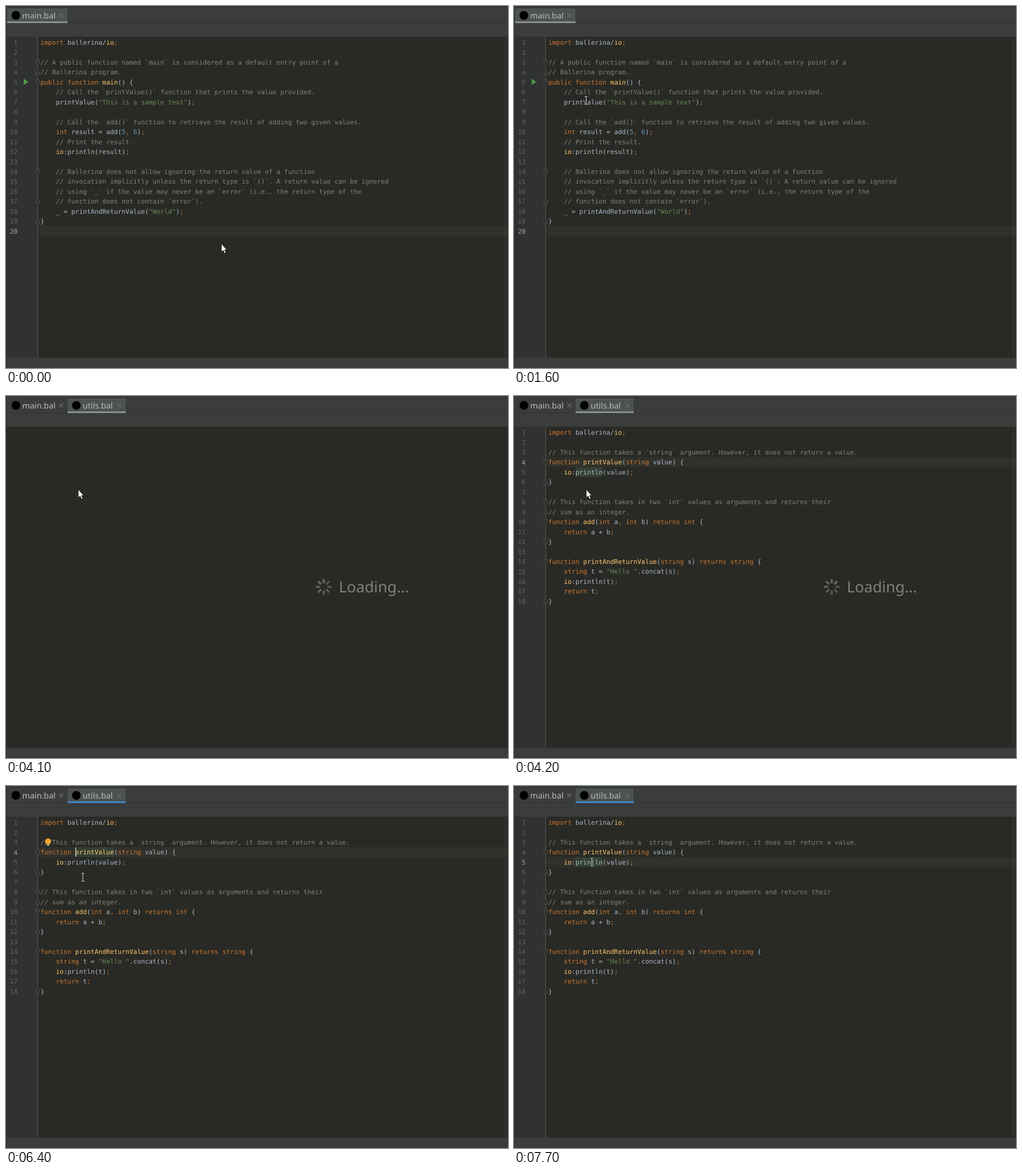
Recreate the animation shown at these times as an HTML page. Size 880 by 636 pixels, loop 8 s.

```html
<!DOCTYPE html>
<html lang="en">
<head>
<meta charset="utf-8">
<title>Go to definition</title>
<style>
html, body { margin: 0; width: 100%; height: 100%; overflow: hidden; background: #292a25; }
svg { display: block; width: 880px; height: 636px; }
text { white-space: pre; text-rendering: geometricPrecision; }
.code { font: 11.27px "DejaVu Sans Mono", monospace; fill: #a9b7c6; }
.num { font: 11.27px "DejaVu Sans Mono", monospace; fill: #606366; text-anchor: end; }
.num.on { fill: #a4a3a3; }
.ui { font: 14.3px "Noto Sans", sans-serif; fill: #bbbbbb; }
.kw { fill: #cc7832; }
.str { fill: #6a8759; }
.int { fill: #6897bb; }
.com { fill: #808080; }
.fn { fill: #ffc66d; }
</style>
</head>
<body>
<svg id="stage" viewBox="0 0 880 636"></svg>
<script>
const NS = 'http://www.w3.org/2000/svg';
const LOOP = 8000, STEP = 100;
const X0 = 60.3, CW = 6.785, TOP = 55.1, LH = 17.45;
const stage = document.getElementById('stage');

const colX = c => X0 + c * CW;
const rowY = n => TOP + (n - 1) * LH;

function add(parent, tag, attrs, text) {
  const el = document.createElementNS(NS, tag);
  for (const k in attrs) el.setAttribute(k, attrs[k]);
  if (text !== undefined) el.textContent = text;
  parent.appendChild(el);
  return el;
}
const group = (parent = stage) => add(parent, 'g', {});
const rect = (p, x, y, width, height, fill) => add(p, 'rect', { x, y, width, height, fill });
const show = (el, on) => el.setAttribute('visibility', on ? 'visible' : 'hidden');

const files = {
  main: {
    lines: `import ballerina/io;

// A public function named \`main\` is considered as a default entry point of a
// Ballerina program.
public function main() {
    // Call the \`printValue()\` function that prints the value provided.
    printValue("This is a sample text");

    // Call the \`add()\` function to retrieve the result of adding two given values.
    int result = add(5, 6);
    // Print the result.
    io:println(result);

    // Ballerina does not allow ignoring the return value of a function
    // invocation implicitly unless the return type is \`()\`. A return value can be ignored
    // using \`_\` if the value may never be an \`error\` (i.e., the return type of the
    // function does not contain \`error\`).
    _ = printAndReturnValue("World");
}
`.split('\n'),
    opens: [3, 5, 14], closes: [4, 17, 19]
  },
  utils: {
    lines: `import ballerina/io;

// This function takes a \`string\` argument. However, it does not return a value.
function printValue(string value) {
    io:println(value);
}

// This function takes in two \`int\` values as arguments and returns their
// sum as an integer.
function add(int a, int b) returns int {
    return a + b;
}

function printAndReturnValue(string s) returns string {
    string t = "Hello ".concat(s);
    io:println(t);
    return t;
}`.split('\n'),
    opens: [4, 8, 10, 14], closes: [6, 9, 12, 18]
  }
};

const TOKEN = /(?<com>\/\/.*)|(?<str>"[^"]*")|(?<fn>(?<=function )\w+|\bio\b)|(?<kw>\b(?:import|public|function|int|string|returns?)\b|[;,])|(?<int>\b\d+\b)|(?<plain>\w+|[^\s\w;,"])/g;

function drawLine(parent, line, n) {
  const el = add(parent, 'text', { class: 'code', y: rowY(n) + 12.9 });
  for (const m of line.matchAll(TOKEN)) {
    const kind = Object.keys(m.groups).find(k => m.groups[k] !== undefined);
    add(el, 'tspan', { x: colX(m.index), class: kind }, m[0]);
  }
}

function drawFold(parent, n, dir) {
  const y = rowY(n) + 8.9;
  add(parent, 'path', {
    d: 'M-3.2 -3.8h6.4v5l-3.2 2.8l-3.2 -2.8zM-1.7 -0.6h3.4',
    transform: `translate(55.5 ${y}) scale(1 ${dir})`,
    fill: '#292a25', stroke: '#595a57', 'stroke-width': 0.9
  });
}

function drawFile({ lines, opens, closes }) {
  const g = group();
  const nums = lines.map((line, i) => {
    drawLine(g, line, i + 1);
    return add(g, 'text', { class: 'num', x: 20.3, y: rowY(i + 1) + 13.1 }, i + 1);
  });
  opens.forEach(n => drawFold(g, n, 1));
  closes.forEach(n => drawFold(g, n, -1));
  return { g, nums };
}

function drawTab(x, width, label) {
  const g = group();
  const back = rect(g, x, 4, width, 25, '#4d5152');
  rect(g, x + width, 4, 1, 25, '#313434');
  const bar = rect(g, x, 27, width, 3, '#8b8f90');
  add(g, 'circle', { cx: x + 15.3, cy: 16.5, r: 7.7, fill: '#000' });
  add(g, 'text', { class: 'ui', x: x + 26.6, y: 22 }, label);
  add(g, 'path', {
    d: `M${x + width - 14.7} 13.2l7 7m0 -7l-7 7`,
    stroke: '#6f7374', 'stroke-width': 1.1
  });
  return { g, back, bar };
}

// Window
rect(stage, 0, 0, 880, 636, '#292a25');
const frame = group();
rect(frame, 0, 54, 55.5, 564, '#303231');
const caretRow = rect(frame, 56, 0, 824, LH, '#31312b');
rect(frame, 55, 54, 1, 564, '#555754');
rect(frame, 875, 54, 1, 564, '#40413b');
const mark = rect(frame, 0, 0, 1, LH - 0.6, '#344134');
rect(stage, 0, 0, 880, 54, '#3a3d3c');
rect(stage, 0, 2.5, 880, 1, '#2d302f');
rect(stage, 0, 29, 880, 1, '#2d302f');
rect(stage, 0, 618, 880, 18, '#3a3d3c');
rect(stage, 0, 0, 1, 636, '#2b2d2d');
rect(stage, 0, 128, 1, 23, '#1f2d40');

const tabs = { main: drawTab(2, 106, 'main.bal'), utils: drawTab(108, 102, 'utils.bal') };
const pages = { main: drawFile(files.main), utils: drawFile(files.utils) };
add(pages.main.g, 'path', { d: 'M31 127.8L39 133.3L31 138.8z', fill: '#519a45' });

const caret = rect(stage, 0, 0, 1.4, LH - 1, '#c4c4c4');

const bulb = group();
add(bulb, 'circle', { cx: 73.8, cy: 97.3, r: 5.4, fill: '#f0a732' });
rect(bulb, 71.5, 100, 4.6, 2.4, '#f0a732');
rect(bulb, 71.5, 103, 4.6, 2, '#a5a9ab');

const loading = group();
const spokes = Array.from({ length: 8 }, (_, i) => add(loading, 'path', {
  d: 'M0 -6.3V-13.8', stroke: '#808080', 'stroke-width': 3.5,
  transform: `translate(557 335.3) rotate(${i * 45})`
}));
add(loading, 'text', { x: 583.6, y: 345, class: 'com', style: 'font: 26.7px "Noto Sans", sans-serif' }, 'Loading...');

const arrow = add(stage, 'path', {
  d: 'M0 0V14.6L3.2 11.7L5.5 17L8 15.9L5.7 10.8H9.6z',
  fill: '#fff', stroke: '#111', 'stroke-width': 0.9
});
const beam = group();
const beamShape = 'M-2.6 -7H-1Q0 -7 0 -6V6Q0 7 -1 7H-2.6M2.6 -7H1Q0 -7 0 -6M2.6 7H1Q0 7 0 6';
add(beam, 'path', { d: beamShape, fill: 'none', stroke: '#111', 'stroke-width': 2.4 });
add(beam, 'path', { d: beamShape, fill: 'none', stroke: '#fff', 'stroke-width': 1 });

// Pointer stops: time, x, y
const path = [
  [0, 379.5, 420], [600, 379.5, 420], [900, 208.5, 243], [1100, 208.5, 243],
  [1400, 132, 160], [1500, 127, 158], [1600, 126.5, 166], [2700, 126.5, 166],
  [3000, 128.7, 166.5], [6200, 128.7, 166.5], [6700, 146, 149], [6900, 148, 138],
  [7100, 136.5, 134], [8000, 136.5, 134]
];

function pointerAt(t) {
  const i = Math.max(1, path.findIndex(p => p[0] >= t));
  const [t0, x0, y0] = path[i - 1], [t1, x1, y1] = path[i];
  const k = (t - t0) / (t1 - t0), e = k * k * (3 - 2 * k);
  return [x0 + (x1 - x0) * e, y0 + (y1 - y0) * e];
}

const within = (t, a, b) => t >= a && t < b;

function place(el, col, row, dx = 0) {
  el.setAttribute('x', colX(col) + dx);
  el.setAttribute('y', rowY(row) + 0.3);
}

function render(now) {
  const t = Math.floor((now % LOOP) / STEP) * STEP;
  const name = t < 4100 ? 'main' : 'utils';
  const blank = within(t, 4100, 4200);
  const focused = within(t, 1900, 4100) || t >= 4300;
  const row = t < 1900 ? 20 : t < 4100 ? 7 : t < 7300 ? 4 : 5;

  show(frame, !blank);
  for (const key in pages) {
    const on = key === name;
    show(pages[key].g, on && !blank);
    tabs[key].back.setAttribute('opacity', on ? 1 : 0);
    tabs[key].bar.setAttribute('opacity', on ? 1 : 0);
    tabs[key].bar.setAttribute('fill', focused ? '#4285c8' : '#8b8f90');
    pages[key].nums.forEach((el, i) => el.setAttribute('class', i + 1 === row ? 'num on' : 'num'));
  }
  show(tabs.utils.g, name === 'utils');
  caretRow.setAttribute('y', rowY(row));

  // Identifier under the caret
  const [col, line, len] = t < 4100 ? [4, 7, 10] : within(t, 4600, 7700) ? [9, 4, 10] : [7, 5, 7];
  place(mark, col, line);
  mark.setAttribute('width', len * CW);
  mark.setAttribute('opacity', t >= 2100 ? 1 : 0);

  place(caret, t < 4100 ? 10 : 9, t < 4100 ? 7 : 4, 0.2);
  show(caret, within(t, 1900, 3400) || within(t, 4300, 5700) || within(t, 6300, 6800));
  show(bulb, within(t, 5200, 7300));

  show(loading, within(t, 4100, 4500));
  loading.setAttribute('opacity', t < 4300 ? 1 : t < 4400 ? 0.65 : 0.3);
  spokes.forEach((el, i) => el.setAttribute('opacity', 0.5 + 0.25 * (((i - t / STEP) % 8 + 8) % 8) / 7));

  const [x, y] = pointerAt(t);
  const isArrow = t < 100 || within(t, 4100, 6300);
  arrow.setAttribute('transform', `translate(${x - 2} ${y - 2.4})`);
  beam.setAttribute('transform', `translate(${x} ${y})`);
  show(arrow, isArrow);
  show(beam, !isArrow);
}

const start = performance.now();
function tick() {
  render(performance.now() - start);
  requestAnimationFrame(tick);
}
tick();
</script>
</body>
</html>
```
